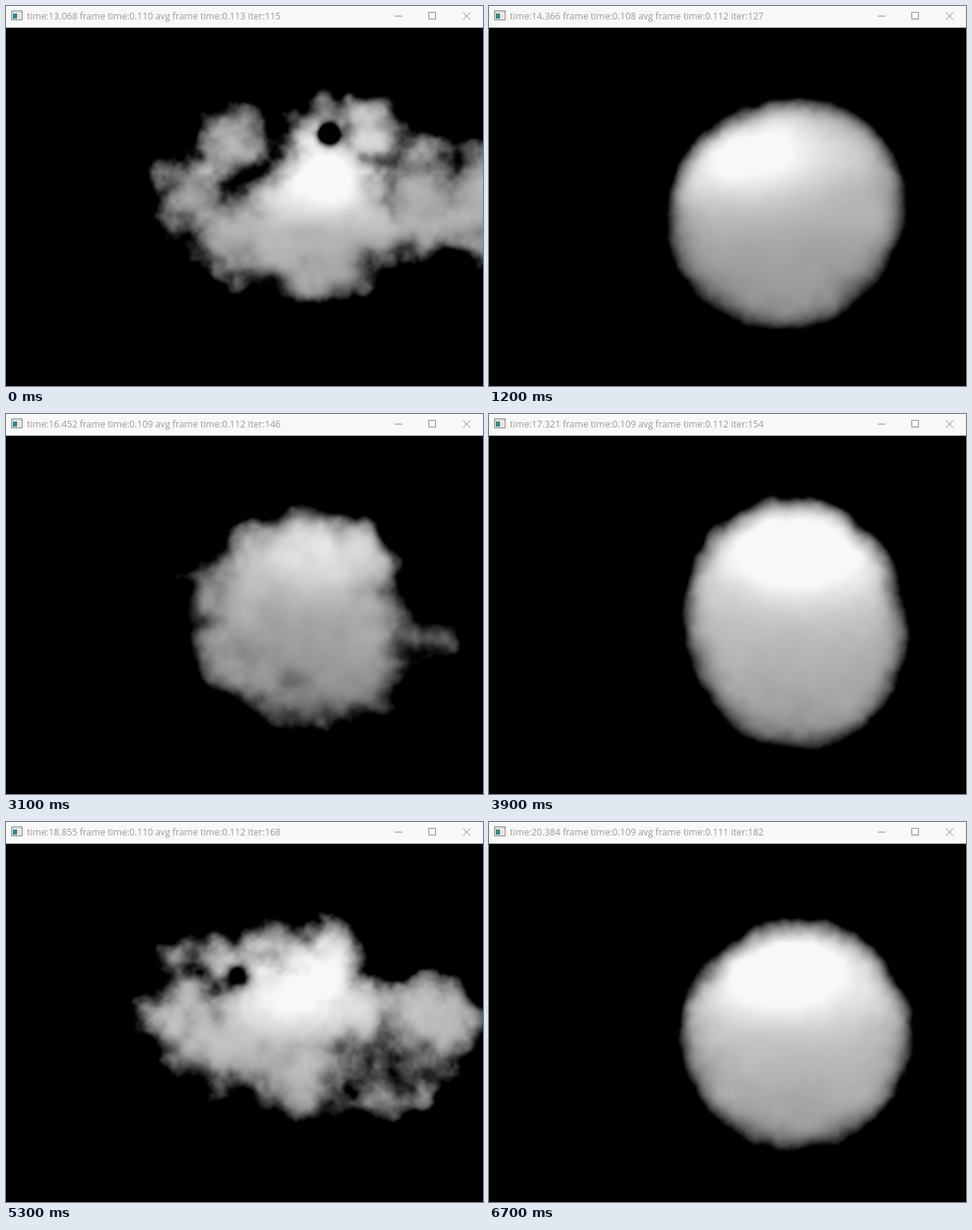
An HTML page with a canvas for the animation above (6.8 s loop, 638 by 509 pixels).

```html
<!DOCTYPE html>
<html lang="en">
<head>
<meta charset="utf-8">
<title>Cloud</title>
<style>
  html, body { margin: 0; width: 100%; height: 100%; overflow: hidden; background: #000; }
  #bar { position: absolute; left: 0; top: 0; width: 638px; height: 29px; background: #f8f8f8; }
  #bar svg { position: absolute; left: 0; top: 0; }
  #label { position: absolute; left: 28px; top: 4px; line-height: 19px; white-space: pre;
    font-family: "Open Sans", "Noto Sans", sans-serif; font-size: 12.3px; color: #999; }
  #cloud { position: absolute; left: 0; top: 29px; width: 638px; height: 480px; }
</style>
</head>
<body>
<div id="bar">
  <svg width="638" height="29" fill="none" stroke="#8a8a8a">
    <rect x="7.5" y="6.5" width="14" height="12" fill="#fff" stroke="#777"/>
    <path d="M8 8.5H21" stroke="#b5bcc4"/>
    <rect x="9" y="10" width="6" height="7" fill="#3f8584" stroke="none"/>
    <path d="M16 11.5H20M16 13.5H20M16 15.5H20" stroke="#ccc"/>
    <path d="M520 13.5H530"/>
    <rect x="565.5" y="8.5" width="9" height="9"/>
    <path d="M611 8.5L621 18.5M621 8.5L611 18.5"/>
  </svg>
  <div id="label"></div>
</div>
<canvas id="cloud" width="319" height="240"></canvas>
<script>
const W = 319, H = 240, SCALE = 2, TOP = 29, MID_Y = 265;
const STEP = 100, STEPS = 68;

const label = document.getElementById('label');
const ctx = document.getElementById('cloud').getContext('2d');
const image = ctx.createImageData(W, H);
const pixels = image.data;
for (let i = 3; i < pixels.length; i += 4) pixels[i] = 255;

const mix = (a, b, t) => a + (b - a) * t;
const clamp = (v, lo, hi) => Math.min(hi, Math.max(lo, v));
const smooth = t => t * t * (3 - 2 * t);

// Two materials: the dense ball and the loose cloud.
const BALL = { rough: 10, soft: 15, grain: 24, shade: 0.22, glow: [95, 52, 75] };
const LOOSE = { rough: 34, soft: 22, grain: 62, shade: 0.14, glow: [75, 55, 85] };

// Puffs are circles [x, y, r] merged softly; a hole is one circle taken away.
const poses = [
  { step: 0, clock: 13.068, pace: 0.110, kind: LOOSE, base: 172, light: [425, 228], hole: [430, 170, 17],
    puffs: [[425, 285, 116], [415, 163, 48], [490, 175, 50], [560, 255, 74], [630, 265, 70],
      [305, 185, 54], [245, 255, 53], [310, 318, 62]] },
  { step: 12, clock: 14.366, pace: 0.108, kind: BALL, base: 178, light: [340, 200],
    puffs: [[385, 285, 150], [415, 268, 145]] },
  { step: 23, clock: 15.583, pace: 0.121, kind: LOOSE, base: 138, light: [385, 175], dim: 0.3, hole: [378, 347, 30],
    puffs: [[385, 265, 122], [300, 320, 62], [270, 240, 52], [210, 240, 49], [150, 300, 28],
      [460, 210, 57], [450, 340, 60], [585, 300, 52], [595, 225, 20]] },
  { step: 39, clock: 17.321, pace: 0.109, kind: BALL, base: 192, light: [415, 190],
    puffs: [[405, 258, 146], [415, 305, 144]] },
  { step: 48, clock: 18.303, pace: 0.110, kind: LOOSE, base: 180, light: [395, 228], hole: [522, 187, 28],
    puffs: [[405, 250, 115], [440, 170, 42], [345, 195, 42], [305, 290, 68], [240, 275, 62],
      [285, 200, 30], [390, 365, 42], [560, 262, 74], [525, 335, 36], [230, 175, 18]] },
  { step: 59, clock: 19.517, pace: 0.107, kind: LOOSE, base: 180, light: [385, 215], hole: [312, 207, 16],
    puffs: [[345, 290, 113], [225, 225, 48], [285, 185, 42], [350, 180, 46], [430, 195, 45],
      [500, 260, 62], [595, 270, 42], [485, 375, 54], [565, 345, 48]] },
  { step: 67, clock: 20.384, pace: 0.109, kind: BALL, base: 195, light: [395, 205],
    puffs: [[411, 285, 155]] }
];

// Maps of depth inside the puffs and of grey tone for one pose.
function shape({ kind, base, light, dim = 1, hole, puffs }) {
  const depth = new Float32Array(W * H), tone = new Float32Array(W * H);
  const [gx, gy, glow] = kind.glow;
  for (let j = 0, p = 0; j < H; j++) {
    for (let i = 0; i < W; i++, p++) {
      const x = (i + 0.5) * SCALE, y = (j + 0.5) * SCALE + TOP;
      let sum = 0;
      for (const [px, py, r] of puffs) sum += Math.exp((r - Math.hypot(x - px, y - py)) / 8);
      depth[p] = 8 * Math.log(sum + 1e-20);
      if (hole) {
        const q = Math.hypot(x - hole[0], y - hole[1]) / hole[2];
        depth[p] -= 90 * Math.exp(-q * q * 1.4);
      }
      const q = ((x - light[0]) / gx) ** 2 + ((y - light[1]) / gy) ** 2;
      tone[p] = base + glow * dim * Math.exp(-0.7 * q) - (y - MID_Y) * kind.shade;
    }
  }
  return { depth, tone };
}
for (const pose of poses) Object.assign(pose, shape(pose));

// Seeded lattice for 3D value noise.
const lattice = new Float32Array(4096);
let seed = 71;
for (let i = 0; i < 4096; i++) {
  seed = (Math.imul(seed, 1664525) + 1013904223) >>> 0;
  lattice[i] = seed / 2147483648 - 1;
}
const cell = (x, y, z) =>
  lattice[((Math.imul(x, 73856093) ^ Math.imul(y, 19349663) ^ Math.imul(z, 83492791)) >>> 3) & 4095];

function noise(x, y, z) {
  const i = Math.floor(x), j = Math.floor(y), k = Math.floor(z);
  const u = smooth(x - i), v = smooth(y - j), w = smooth(z - k);
  const layer = c => mix(
    mix(cell(i, j, c), cell(i + 1, j, c), u),
    mix(cell(i, j + 1, c), cell(i + 1, j + 1, c), u), v);
  return mix(layer(k), layer(k + 1), w);
}

function fbm(x, y, z) {
  let sum = 0, gain = 0.55;
  for (let o = 0; o < 4; o++) {
    sum += gain * noise(x, y, z);
    x = x * 2.02 + 11.3;
    y = y * 2.02 + 5.7;
    z = z * 2.02 + 3.1;
    gain *= 0.5;
  }
  return sum;
}

function drawCloud(a, b, e, clock) {
  const [rough, soft, grain] = ['rough', 'soft', 'grain'].map(k => mix(a.kind[k], b.kind[k], e));
  for (let j = 0, p = 0; j < H; j++) {
    for (let i = 0; i < W; i++, p++) {
      let v = 0;
      let d = mix(a.depth[p], b.depth[p], e);
      if (d > -rough) {
        const x = i * SCALE + clock * 34, y = j * SCALE + clock * 7;
        const n = fbm(x / 40, y / 40, clock * 0.6);
        d += n * rough;
        if (d > 0) {
          const cover = 1 - Math.exp(-d / soft - d * d / 1500);
          const thin = 0.2 + 0.8 * Math.exp(-d / 50);
          v = (mix(a.tone[p], b.tone[p], e) + n * grain * thin) * cover;
        }
      }
      pixels[p * 4] = pixels[p * 4 + 1] = pixels[p * 4 + 2] = clamp(v, 0, 248);
    }
  }
  ctx.putImageData(image, 0, 0);
}

function draw(step) {
  const next = Math.max(1, poses.findIndex(pose => pose.step >= step));
  const a = poses[next - 1], b = poses[next];
  const t = (step - a.step) / (b.step - a.step);
  const clock = mix(a.clock, b.clock, t);
  const pace = t === 0 ? a.pace : t === 1 ? b.pace : (b.clock - a.clock) / (b.step - a.step);
  const average = 0.1126 - step * 0.000018;
  label.textContent = `time:${clock.toFixed(3)} frame time:${pace.toFixed(3)} ` +
    `avg frame time:${average.toFixed(3)} iter:${115 + step}`;
  // Each pose rests a little before it turns into the next.
  drawCloud(a, b, smooth(clamp((t - 0.2) / 0.6, 0, 1)), clock);
}

const start = performance.now();
let shown = -1;
function tick() {
  const step = Math.floor((performance.now() - start) / STEP) % STEPS;
  if (step !== shown) draw(shown = step);
  requestAnimationFrame(tick);
}
tick();
</script>
</body>
</html>
```
